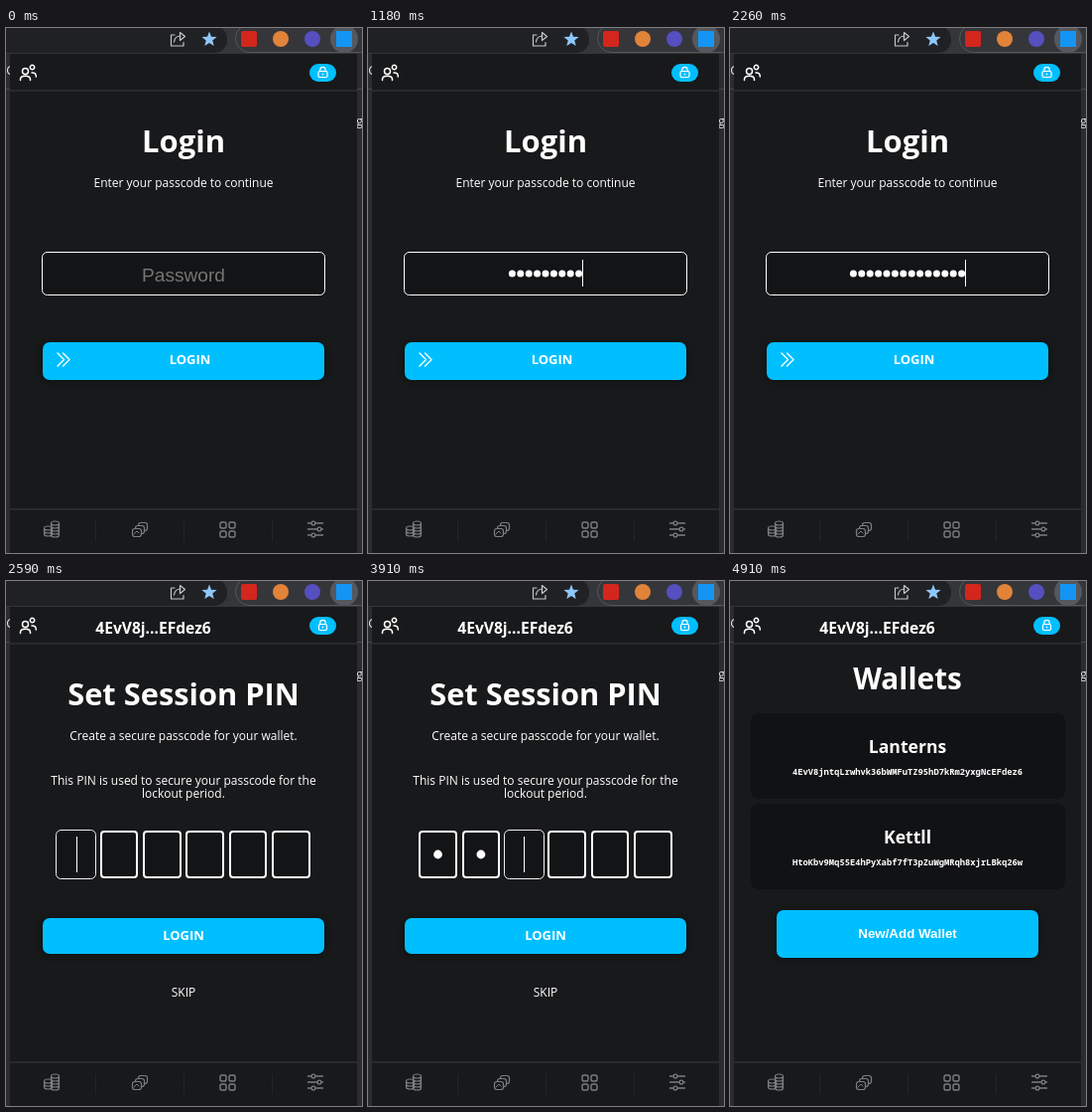
Recreate the animation shown at these times as an HTML page with a canvas. Size 359 by 528 pixels, loop 5.33 s.

```html
<!DOCTYPE html>
<html lang="en">
<head>
<meta charset="utf-8">
<title>Wallet login</title>
<style>
html, body { margin: 0; width: 100%; height: 100%; overflow: hidden; background: #18191b; }
canvas { display: block; }
</style>
</head>
<body>
<canvas id="stage" width="359" height="528"></canvas>
<script>
const ctx = document.getElementById('stage').getContext('2d');
const LOOP = 5330;
const PIN_START = 2590, WALLETS_START = 4910;
const KEY_TIMES = [90, 260, 440, 510, 680, 850, 930, 1090, 1180, 1600, 1760, 2010, 2170, 2260];
// Digits and focus moves alternate.
const PIN_TIMES = [3600, 3670, 3740, 3910, 4070, 4160, 4330, 4500, 4580, 4670, 4830];
const SANS = '"Open Sans", "Noto Sans", sans-serif';
const ARIAL = '"Liberation Sans", Arial, sans-serif';
const MONO = '"Noto Sans Mono", "DejaVu Sans Mono", monospace';
const WHITE = '#fff', ACCENT = '#00bfff', PANEL = '#18191b', FIELD = '#131416', MUTED = '#7c7e81';
const WALLETS = [
  { name: 'Lanterns', key: '4EvV8jntqLrwhvk36bWMFuTZ95hD7kRm2yxgNcEFdez6' },
  { name: 'Kettll', key: 'HtoKbv9Mq55E4hPyXabf7fT3pZuWgMRqh8xjrLBkq26w' }
];
const SHORT_KEY = WALLETS[0].key.slice(0, 6) + '...' + WALLETS[0].key.slice(-6);

const passed = (times, t) => times.filter(at => t >= at).length;

function rect(x, y, w, h, color) {
  ctx.fillStyle = color;
  ctx.fillRect(x, y, w, h);
}

function roundPath(x, y, w, h, r) {
  ctx.beginPath();
  ctx.roundRect(x, y, w, h, r);
}

function box(x, y, w, h, r, color) {
  roundPath(x, y, w, h, r);
  ctx.fillStyle = color;
  ctx.fill();
}

function frame(x, y, w, h, r, color, width) {
  roundPath(x, y, w, h, r);
  ctx.strokeStyle = color;
  ctx.lineWidth = width;
  ctx.stroke();
}

function disc(x, y, r, color) {
  ctx.beginPath();
  ctx.arc(x, y, r, 0, Math.PI * 2);
  ctx.fillStyle = color;
  ctx.fill();
}

function stroke(path, color, width) {
  ctx.strokeStyle = color;
  ctx.lineWidth = width;
  ctx.lineCap = ctx.lineJoin = 'round';
  ctx.stroke(new Path2D(path));
}

function text(str, x, y, font, color = WHITE) {
  ctx.font = font;
  ctx.textAlign = 'center';
  ctx.fillStyle = color;
  ctx.fillText(str, x, y);
}

const title = (str, size) => text(str, 179, 125, `bold ${size}px ${SANS}`);
const line = (str, y) => text(str, 179, y, `500 12px ${SANS}`);

function button(x, y, w, h) {
  ctx.save();
  ctx.shadowColor = 'rgba(0,0,0,.4)';
  ctx.shadowBlur = 10;
  ctx.shadowOffsetY = 1;
  box(x, y, w, h, 7, ACCENT);
  ctx.restore();
}

function star(x, y, r, color) {
  ctx.beginPath();
  for (let i = 0; i < 10; i++) {
    const a = i * Math.PI / 5 - Math.PI / 2, d = i % 2 ? r * 0.43 : r;
    ctx.lineTo(x + d * Math.cos(a), y + d * Math.sin(a));
  }
  ctx.closePath();
  ctx.fillStyle = color;
  ctx.fill();
}

function browser() {
  rect(0, 0, 359, 528, '#2b2c2f');
  rect(0, 0, 359, 26, '#35363a');
  box(-30, -2, 253, 27, 13, '#202124');
  stroke('M170 7h-3.5v11h12.5v-3.5 M169.5 14c.5-4 3-6 6.5-6 M175.5 4.5l5 4-5 4z', '#c4c7cc', 1.2);
  star(205, 11.5, 8, '#8fc7fb');
  frame(231.5, -3.5, 140, 28, 14, '#55575b', 1);
  disc(341, 11, 14, '#55585e');
  box(237, 3, 16, 16, 2, '#d3261d');
  disc(277, 11, 8, '#e2833a');
  disc(309, 11, 8, '#554fc0');
  rect(333, 3, 16, 16, '#1495f5');
  rect(0, 61, 359, 1, '#47494d');
  text('C', 4, 47, `500 12px ${SANS}`, '#e4e5e7');
  text('g', 356.5, 98, `500 12px ${SANS}`, '#e4e5e7');
}

function padlock(unlocked) {
  box(306, 36, 27, 18, 9, ACCENT);
  const half = unlocked ? 4 : 4.5;
  frame(319.5 - half, 43.5, half * 2, 6, 1.2, WHITE, 1.2);
  stroke('M316.8 43v-1a2.7 2.7 0 0 1 5.4 0v1 M319.5 46v1', WHITE, 1.2);
}

function chrome(unlocked) {
  rect(4, 26, 350, 502, PANEL);
  rect(4, 62, 350, 2, '#292a2d');
  rect(4, 483, 350, 2, '#292a2d');
  stroke('M22.5 43.5a3 3 0 1 1-6 0a3 3 0 1 1 6 0 ' +
    'M14.5 52.5v-1c0-4.5 10-4.5 10 0v1 ' +
    'M28.7 39.5a2.2 2.2 0 1 1-4.4 0a2.2 2.2 0 1 1 4.4 0 ' +
    'M26 45c2.5-.4 4.3 1 4.3 3.5v.5', WHITE, 1.5);
  padlock(unlocked);
  if (unlocked) text(SHORT_KEY, 148.5, 53, `bold 15.6px ${SANS}`);
  for (const x of [90, 179, 268]) rect(x, 496, 1, 20, '#242528');
  footerIcons();
}

function coins(x, y, layers) {
  let path = `M${x} ${y}a4 2 0 1 1 8 0a4 2 0 1 1-8 0 M${x} ${y}v${layers * 3} M${x + 8} ${y}v${layers * 3}`;
  for (let i = 1; i <= layers; i++) path += `M${x} ${y + i * 3}a4 2 0 0 0 8 0`;
  stroke(path, MUTED, 1.2);
}

function footerIcons() {
  coins(45.5, 498, 4);
  coins(38.5, 503, 2);
  for (let i = 2; i >= 0; i--) {
    const x = 127 + i * 3, y = 503 - i * 3;
    box(x, y, 9, 8, 2.5, PANEL);
    frame(x + 0.5, y + 0.5, 9, 8, 2.5, MUTED, 1.2);
  }
  stroke('M129 509l3-3 2 2', MUTED, 1);
  for (const x of [216, 225]) for (const y of [497, 506]) frame(x, y, 6, 6, 1.8, MUTED, 1.4);
  [[498, 310], [504, 316], [510, 310]].forEach(([y, knob]) => {
    stroke(`M304.5 ${y}h15`, MUTED, 1.3);
    disc(knob, y, 2.3, PANEL);
    ctx.beginPath();
    ctx.arc(knob, y, 1.9, 0, Math.PI * 2);
    ctx.stroke();
  });
}

function login(t) {
  title('Login', 31);
  line('Enter your passcode to continue', 160);
  box(36, 225, 286, 44, 5, FIELD);
  frame(36.5, 225.5, 285, 43, 5, WHITE, 1);
  const count = passed(KEY_TIMES, t), pitch = 8.4, left = 179 - count * pitch / 2;
  if (!count) text('Password', 179, 255, `19.1px ${ARIAL}`, '#757575');
  else rect(Math.floor(left + count * pitch), 233, 1, 27, WHITE);
  for (let i = 0; i < count; i++) disc(left + (i + 0.5) * pitch, 247, 3.5, WHITE);
  button(37, 316, 284, 38);
  stroke('M52 327l6.5 6.5-6.5 6.5 M57.5 327l6.5 6.5-6.5 6.5', WHITE, 1.4);
  text('LOGIN', 185.5, 338, `bold 13px ${SANS}`);
}

function pin(t) {
  title('Set Session PIN', 30.8);
  line('Create a secure passcode for your wallet.', 160);
  line('This PIN is used to secure your passcode for the', 205);
  line('lockout period.', 218);
  const step = passed(PIN_TIMES, t), dots = Math.ceil(step / 2), focus = Math.floor(step / 2);
  const caretOn = t < 3090 || t >= 3600;
  for (let i = 0; i < 6; i++) {
    // Edges snap to whole pixels; contents keep the fractional centre.
    const left = 51.2 + i * 43.4, center = left + 19.3;
    const x = Math.round(left), w = Math.round(left + 38.6) - x;
    box(x, 251, w, 48, 4, FIELD);
    if (i === focus) frame(x - 0.5, 250.5, w + 1, 49, 5, '#f0f0f0', 1);
    else frame(x + 1, 252, w - 2, 46, 3, WHITE, 2);
    if (i < dots) disc(center, 275, 4.4, WHITE);
    if (i === focus && caretOn) rect(Math.round(center) + (i < dots ? 5 : 0), 257, 1, 36, WHITE);
  }
  button(37, 339, 284, 36);
  text('LOGIN', 179, 361, `bold 13px ${SANS}`);
  line('SKIP', 418);
}

function wallets() {
  text('Wallets', 179, 109, `bold 29.8px ${SANS}`);
  WALLETS.forEach(({ name, key }, i) => {
    const y = 133 + i * 91;
    box(21, y, 317, 86, 8, '#111214');
    text(name, 179, y + 40, `bold 17.6px ${SANS}`);
    text(key, 179, y + 62, `600 8.8px ${MONO}`);
  });
  button(47, 331, 264, 48);
  text('New/Add Wallet', 179, 359, `bold 13.33px ${ARIAL}`);
}

function draw() {
  const t = performance.now() % LOOP;
  browser();
  chrome(t >= PIN_START);
  if (t < PIN_START) login(t);
  else if (t < WALLETS_START) pin(t);
  else wallets();
  requestAnimationFrame(draw);
}
draw();
</script>
</body>
</html>
```
